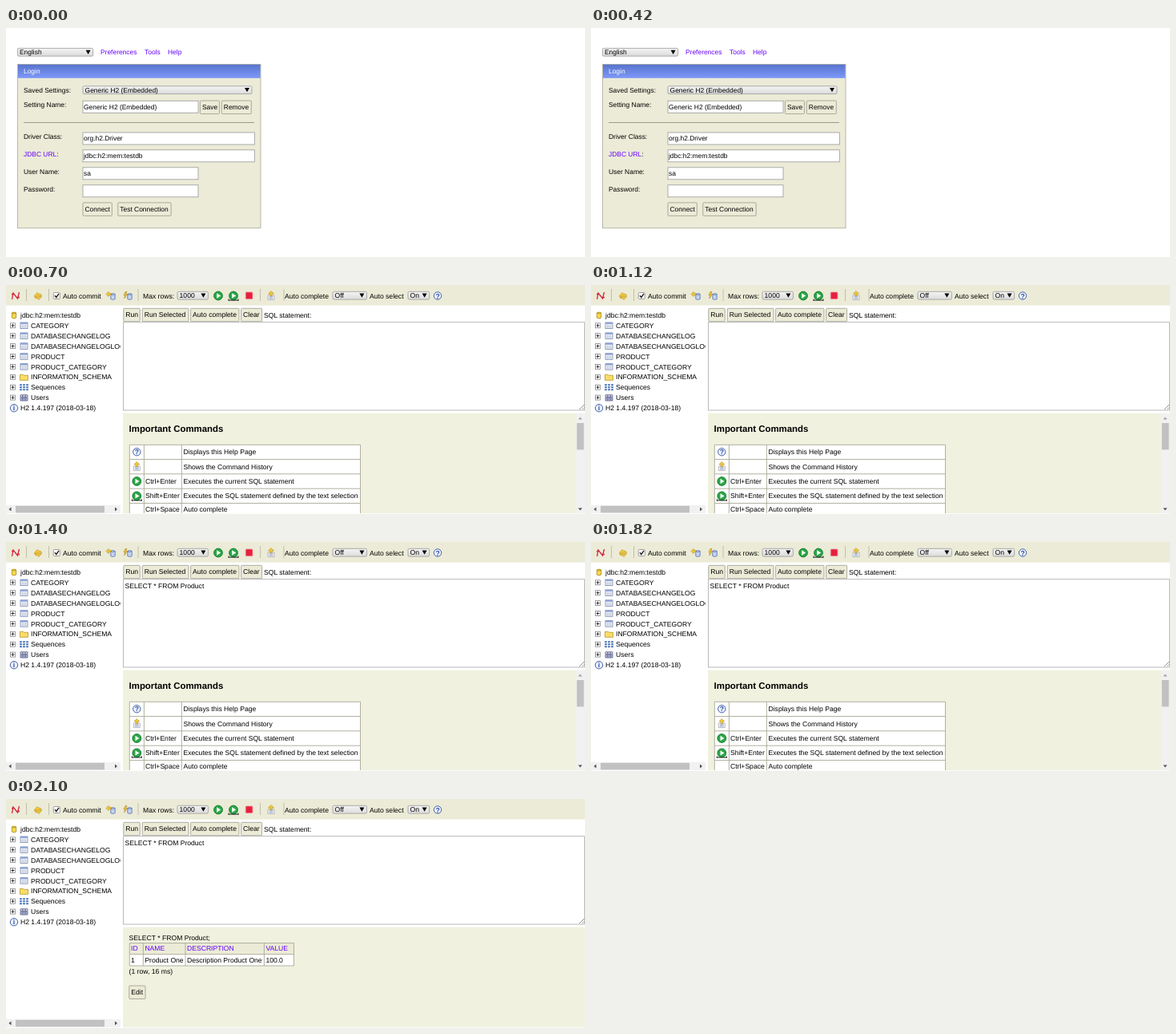
Write an HTML page that moves like this. It is 723 by 287 pixels and loops after 2.8 s.

```html
<!DOCTYPE html>
<html lang="en">
<head>
<meta charset="utf-8">
<title>H2 Console</title>
<style>
html, body { margin: 0; width: 100%; height: 100%; overflow: hidden; background: #fff; }
svg { display: block; width: 723px; height: 287px; }
text { font: 8.6px "Liberation Sans", Arial, sans-serif; text-rendering: geometricPrecision; white-space: pre; }
#login text { font-size: 8.43px; }
#help .title { font-size: 11.4px; font-weight: bold; }
.link { fill: #60f; }
</style>
</head>
<body>
<svg viewBox="0 0 723 287">
  <defs>
    <linearGradient id="bar" x2="0" y2="1"><stop stop-color="#5874cc"/><stop offset="1" stop-color="#7d98fa"/></linearGradient>
    <linearGradient id="grey" x2="0" y2="1"><stop stop-color="#f4f4f4"/><stop offset="1" stop-color="#dcdcdc"/></linearGradient>
    <clipPath id="treeClip"><path d="M0 26H143V276H0z"/></clipPath>
    <clipPath id="helpClip"><path d="M146 160H712V286H146z"/></clipPath>
  </defs>
  <g id="login"></g>
  <g id="console"></g>
  <g id="query"></g>
  <g id="help"></g>
  <g id="result"></g>
</svg>
<script>
const BEIGE = '#ebebd7', PALE = '#f0f1df', LINE = '#aaa998';
const $ = id => document.getElementById(id);

const text = (x, y, s, cls = '', fill = '') =>
  `<text x="${x}" y="${y}" class="${cls}"${fill && ` fill="${fill}"`}>${s}</text>`;
const rect = (x, y, w, h, fill, stroke = 'none', r = 0) =>
  `<rect x="${x}" y="${y}" width="${w}" height="${h}" rx="${r}" fill="${fill}" stroke="${stroke}" stroke-width=".8"/>`;
const path = (d, fill, stroke = 'none', w = 1) =>
  `<path d="${d}" fill="${fill}" stroke="${stroke}" stroke-width="${w}"/>`;
const circle = (x, y, r, fill, stroke = 'none') =>
  `<circle cx="${x}" cy="${y}" r="${r}" fill="${fill}" stroke="${stroke}"/>`;
const at = (x, y, s) => `<g transform="translate(${x} ${y})">${s}</g>`;

const input = (x, y, w, s = '') => rect(x, y, w, 15, '#fff', '#999') + text(x + 1, y + 10.3, s);
const button = (x, y, w, s) => rect(x, y, w, 16.5, BEIGE, '#9b9a8c', 1) + text(x + 2.5, y + 11.1, s);
const select = (x, y, w, s) => rect(x, y, w, 9.8, 'url(#grey)', '#999', 1.5) + text(x + 2.6, y + 8, s) +
  path(`M${x + w - 9} ${y + 2.3}h6l-3 5.2z`, '#000');
const grid = (xs, ys) => path(
  xs.map(x => `M${x} ${ys[0]}V${ys.at(-1)}`).join('') +
  ys.map(y => `M${xs[0]} ${y}H${xs.at(-1)}`).join(''), 'none', LINE, .9);

// Icons are centred on 0,0.
const play = circle(0, 0, 5.4, '#2aa745', '#178033') + path('M-1.8-3.2L3.2 0L-1.8 3.2z', '#fff');
const playSelected = play + path('M-6 5.6H6M-6 4V6.5M6 4V6.5', 'none', '#222');
const ring = s => circle(0, 0, 4.7, '#eef4ff', '#405fa5') +
  `<text y="3.1" text-anchor="middle" style="font-weight:bold" fill="#2c4c9c">${s}</text>`;
const history = path('M-4-.5H4V5H-4z', '#fff', '#a5a5b0', .8) + path('M-2.5 1.3H2.5M-2.5 3.2H2.5', 'none', '#6077a8', .8) +
  path('M0-6L3.4-2.6H1.2V0H-1.2V-2.6H-3.4z', '#f4cb3b', '#b88c16', .6);
const disconnect = path('M-4.5 4.5L-3-3.5L2.5 3.5L4.5-4.5M-5-2H-1.5M1.5 2H5', 'none', '#d3253c', 1.3);
const refresh = path('M-4.5 0L-1-4L0-2.5Q4-3 4.5 0L2.5-.5L1 1L0-.3L-2 1z', '#f5cb35', '#b98b14', .6) +
  path('M4.5 1L1 5L0 3.5Q-4 4-4.5 1L-1 1.5z', '#f5cb35', '#b98b14', .6);
const cylinder = (fill, edge) => path('M-2.7-3V3Q0 5 2.7 3V-3Q0-5-2.7-3Q0-1 2.7-3', fill, edge, .8);
const rollback = at(2.5, 1, cylinder('#c6d3f2', '#526fa9')) + path('M-6-2L-3-5V-3.2H0V-.8H-3V1z', '#f4cb3b', '#b88c16', .6);
const commit = at(2.5, 1, cylinder('#c6d3f2', '#526fa9')) + path('M-3-5L-5-.5H-3L-4.5 3.5L-.5-2H-2.5L-1-5z', '#f4cb3b', '#a97d14', .6);
const table = rect(-4.5, -3.8, 9, 7.6, '#fff', '#7385a8') + rect(-4.5, -3.8, 9, 2, '#8da3d8') +
  path('M-4 .2H4M-4 2H4M-1.5-2V3.5M1.5-2V3.5', 'none', '#a5b1cb', .6);
const folder = path('M-5-3H-1L0-2H5V4H-5z', '#f9dd68', '#b89625', .8);
const sequence = [-3, 0, 3].map(y => [-4, 0, 4].map(x => rect(x - 1.4, y - 1, 2.8, 2, '#4c78b8')).join('')).join('');
const users = [-3, 3, 0].map(x => circle(x, -2, 1.7, '#d5d5e4', '#666b91') +
  path(`M${x - 1.6} 4V0H${x + 1.6}V4z`, '#a3a8cd', '#666b91', .7)).join('');
const plus = rect(-3, -3, 6, 6, '#fff', '#888') + path('M-2 0H2M0-2V2', 'none', '#222', .9);

$('login').innerHTML =
  select(14.4, 25.4, 94.2, 'English') +
  text(118, 33.3, 'Preferences', 'link') + text(173, 33.3, 'Tools', 'link') + text(202, 33.3, 'Help', 'link') +
  rect(14.5, 45.5, 303.5, 205.3, BEIGE, LINE) + rect(15, 45.8, 302.6, 17, 'url(#bar)') +
  text(22, 57.3, 'Login', '', '#fff') +
  [['Saved Settings:', 81], ['Setting Name:', 99], ['Driver Class:', 139], ['User Name:', 183], ['Password:', 205]]
    .map(([s, y]) => text(22, y, s)).join('') +
  text(22, 161, '<tspan class="link">JDBC URL</tspan>:') +
  select(96, 72.8, 211, 'Generic H2 (Embedded)') +
  input(96, 91.3, 144, 'Generic H2 (Embedded)') + button(242.4, 91.1, 24, 'Save') + button(269.3, 91.1, 37, 'Remove') +
  path('M22 118.5H310', 'none', '#9a9a90') +
  input(96, 131, 214.3, 'org.h2.Driver') + input(96, 152.8, 214.3, 'jdbc:h2:mem:testdb') +
  input(96, 174.8, 144, 'sa') + input(96, 196.8, 144) +
  button(96, 218.9, 36.3, 'Connect') + button(139.8, 218.9, 66.3, 'Test Connection');

const toolbar = [[12, disconnect], [40, refresh], [131, rollback], [152, commit], [265, play],
  [284, playSelected], [331, history], [539, ring('?')]];
const tree = [[table, 'CATEGORY'], [table, 'DATABASECHANGELOG'], [table, 'DATABASECHANGELOGLOCK'], [table, 'PRODUCT'],
  [table, 'PRODUCT_CATEGORY'], [folder, 'INFORMATION_SCHEMA'], [sequence, 'Sequences'], [users, 'Users']];

$('console').innerHTML =
  rect(0, 0, 723, 25.6, BEIGE) +
  toolbar.map(([x, icon]) => at(x, 13.5, icon)).join('') +
  path([25.5, 53.5, 165, 317.5, 347].map(x => `M${x} 5V20`).join(''), 'none', '#b5b4a5', .8) +
  rect(59.3, 9.5, 8, 8, '#fff', '#888', 1) + path('M61 13.3L62.8 15.5L66 10.8', 'none', '#222', 1.4) +
  rect(299.3, 9, 8.6, 8.6, '#e5203d', '#f08090', 1) +
  text(71, 16.7, 'Auto commit') + text(171, 16.7, 'Max rows:') +
  text(348, 16.7, 'Auto complete') + text(454, 16.7, 'Auto select') +
  select(214, 8.3, 38.4, '1000') + select(408, 8.3, 42.4, 'Off') + select(502, 8.3, 26.6, 'On') +
  `<g clip-path="url(#treeClip)">` +
  at(10, 38, cylinder('#f5d94b', '#a98816')) + text(18, 41, 'jdbc:h2:mem:testdb') +
  tree.map(([icon, name], i) => {
    const y = 50.8 + i * 12.9;
    return at(8.5, y, plus) + at(22.5, y, icon) + text(31, y + 3.1, name);
  }).join('') +
  at(10, 154.2, ring('i')) + text(18, 157.2, 'H2 1.4.197 (2018-03-18)') + '</g>' +
  rect(0, 276, 143, 10, '#f1f1f1') + rect(12, 276.8, 111, 8.6, '#c1c1c1') +
  path('M6.5 278.5V283.5L3.5 281z', '#505050') + path('M136 278.5V283.5L139 281z', '#505050') +
  button(146.8, 29.3, 20.5, 'Run') + button(170.2, 29.3, 57.8, 'Run Selected') +
  button(230.6, 29.3, 60.4, 'Auto complete') + button(293.6, 29.3, 26, 'Clear') + text(322, 40.6, 'SQL statement:') +
  rect(146.5, 46.7, 576, 110.3, '#fff', '#a9a9a9') + path('M716 156L722 150M719.5 156L722 153.5', 'none', '#777', .8) +
  rect(146, 160.6, 577, 125.6, PALE);

$('query').innerHTML = text(148.6, 57.5, 'SELECT * FROM Product');

const commands = [
  [ring('?'), '', 'Displays this Help Page'],
  [history, '', 'Shows the Command History'],
  [play, 'Ctrl+Enter', 'Executes the current SQL statement'],
  [playSelected, 'Shift+Enter', 'Executes the SQL statement defined by the text selection'],
  ['', 'Ctrl+Space', 'Auto complete']];

$('help').innerHTML =
  `<g clip-path="url(#helpClip)">` + text(153.6, 184, 'Important Commands', 'title') +
  rect(154, 200, 288.6, 90, '#fff') + grid([154.3, 172.4, 219.4, 442.5], [200.3, 218.5, 236.8, 255.2, 273.5, 292]) +
  commands.map(([icon, key, what], i) => {
    const y = i < 4 ? 209.2 + i * 18.4 : 281;
    return at(163.3, y, icon) + text(174, y + 3, key) + text(221.5, y + 3, what);
  }).join('') + '</g>' +
  rect(712, 160.6, 11, 125.6, '#f1f1f1') + rect(712.8, 173, 8.8, 33.4, '#c1c1c1') +
  path('M714.5 168.5H719.5L717 165.5z', '#a3a3a3') + path('M714.5 279.5H719.5L717 282.5z', '#505050');

const columns = [[156, 'ID', '1'], [173.4, 'NAME', 'Product One'],
  [226, 'DESCRIPTION', 'Description Product One'], [324.4, 'VALUE', '100.0']];

$('result').innerHTML =
  text(153.6, 176.6, 'SELECT * FROM Product;') +
  rect(154, 180.6, 205.5, 14, BEIGE) + rect(154, 194.6, 205.5, 14.4, '#fff') +
  grid([154.3, 171.3, 224, 322.4, 359.5], [180.6, 194.6, 209]) +
  columns.map(([x, head, value]) => text(x, 190.4, head, 'link') + text(x, 204.8, value)).join('') +
  text(153.6, 218.5, '(1 row, 16 ms)') + button(153.8, 234, 20.2, 'Edit');

const STEP = 700;
const visible = { login: [0], console: [1, 2, 3], query: [2, 3], help: [1, 2], result: [3] };

function draw() {
  const scene = Math.floor(performance.now() / STEP) % 4;
  for (const id in visible) $(id).style.display = visible[id].includes(scene) ? '' : 'none';
  requestAnimationFrame(draw);
}
draw();
</script>
</body>
</html>
```
